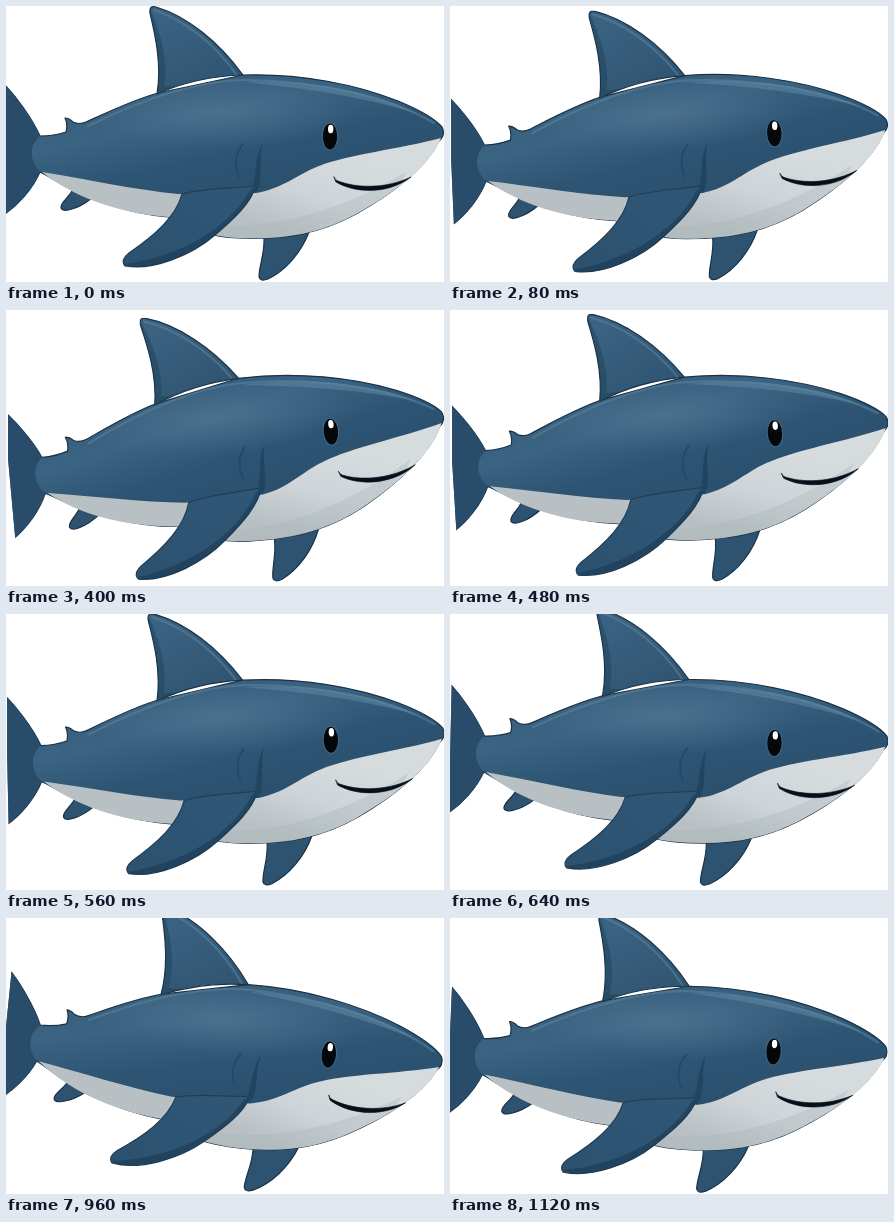
Recreate the animation shown at these times as an HTML page with a canvas. Size 438 by 276 pixels, loop 1.2 s.

```html
<!DOCTYPE html>
<html lang="en">
<head>
<meta charset="utf-8">
<title>Swimming shark</title>
<style>
html, body { margin: 0; width: 100%; height: 100%; overflow: hidden; background: #fff; }
canvas { display: block; }
</style>
</head>
<body>
<canvas id="stage" width="438" height="276"></canvas>
<script>
const W = 438, H = 276, LOOP = 1200, STEP = 80;
const ctx = document.getElementById('stage').getContext('2d');

const INK = '#1a3247';
const body = new Path2D(`M-4 76 C10 90 26 112 34 130 Q48 130 60 126
  Q62 118 59 112 Q63 112 67 116 Q73 119 80 116 C102 106 127 94 152 87
  L237 69 C295 67 352 79 392 95 Q426 109 436 121 Q440 129 433 135
  C420 162 386 188 350 208 C315 227 280 234 232 232
  C205 231 180 222 162 211 C128 208 86 197 38 168 L34 166
  C27 182 13 199 -4 210 Z`);
const belly = new Path2D(`M435 132 C394 143 344 148 313 160 C290 169 276 183 250 187
  L172 188 C130 184 80 173 36 166 C66 190 110 207 162 211
  C180 222 205 231 232 232 C280 234 315 227 350 208 C386 188 423 162 435 132 Z`);
const bellyShade = new Path2D('M208 219 C270 224 340 203 401 165 L380 205 L280 245 L190 235 Z');
const tail = new Path2D('M-4 76 C10 90 26 112 34 130 C22 140 24 156 34 166 C27 182 13 199 -4 210 Z');
const dorsal = new Path2D(`M151 88 C156 58 149 28 144 7 Q143 -1 150 1
  C181 10 213 36 237 69 C205 70 178 76 151 88 Z`);
const dorsalShade = new Path2D('M144 2 C157 32 162 58 158 80 L178 80 L150 92 L140 40 Z');
const dorsalEdge = new Path2D('M148 4 C178 14 208 37 230 68');
const pectoral = new Path2D(`M176 188 C170 211 148 230 123 247 Q114 254 119 260
  C147 265 186 249 209 229 C229 212 244 198 250 180 C223 183 197 182 176 188 Z`);
const pectoralShade = new Path2D('M118 258 C168 252 222 225 244 184 L256 178 L236 225 L150 270 Z');
const pelvic = new Path2D(`M258 231 C259 248 253 259 253 271 Q254 276 262 273
  C279 265 295 247 303 226 Q280 233 258 231 Z`);
const rear = new Path2D('M67 183 C64 191 54 196 55 202 Q57 206 66 203 C77 200 83 194 90 189 Z');
const back = new Path2D('M82 120 C133 95 190 74 240 74 C309 74 384 91 428 117');
const sheen = new Path2D('M238 76 C300 73 372 86 412 108 C362 92 300 82 238 76 Z');
const gill = new Path2D('M237 138 C228 148 229 160 233 171');
const gillFold = new Path2D('M257 137 C249 149 251 166 246 184 L250 187 C259 172 251 158 257 137 Z');
const mouth = new Path2D('M328 171 Q329 174 332 175 C353 183 382 182 405 171 C383 188 350 188 330 176 Z');

function gradient(x0, y0, x1, y1, ...stops) {
  const g = ctx.createLinearGradient(x0, y0, x1, y1);
  stops.forEach((c, i) => g.addColorStop(i / (stops.length - 1), c));
  return g;
}
const skin = gradient(200, 60, 230, 195, '#365d7b', '#3b6382', '#2d5473', '#2b506e');
const finSkin = gradient(210, 180, 150, 265, '#2f5675', '#2c5270');
const dorsalSkin = gradient(160, 10, 200, 85, '#3b6280', '#2f5573');
const white = gradient(330, 150, 300, 235, '#d6dbde', '#ced4d7', '#b8c0c3');
const glow = ctx.createRadialGradient(0, 0, 0, 0, 0, 90);
glow.addColorStop(0, 'rgba(98,134,160,.4)');
glow.addColorStop(1, 'rgba(98,134,160,0)');

function shape(path, fill, line, width = 1.2) {
  ctx.fillStyle = fill;
  ctx.fill(path);
  if (line) stroke(path, line, width);
}
function stroke(path, color, width) {
  ctx.strokeStyle = color;
  ctx.lineWidth = width;
  ctx.stroke(path);
}
function within(path, paint) {
  ctx.save();
  ctx.clip(path);
  paint();
  ctx.restore();
}
function oval(x, y, rx, ry, fill) {
  ctx.beginPath();
  ctx.ellipse(x, y, rx, ry, 0, 0, Math.PI * 2);
  ctx.fillStyle = fill;
  ctx.fill();
}

function shark() {
  shape(rear, '#2d5371', INK);
  shape(pelvic, '#2d5371', INK);
  shape(body, skin, INK);
  shape(tail, '#284c69');
  shape(dorsal, dorsalSkin, INK);
  within(dorsal, () => shape(dorsalShade, 'rgba(28,62,88,.45)'));

  // Soft light on the flank
  within(body, () => {
    ctx.translate(215, 107);
    ctx.scale(1.5, 0.4);
    ctx.fillStyle = glow;
    ctx.fillRect(-90, -90, 180, 180);
  });

  shape(belly, white);
  within(belly, () => shape(bellyShade, 'rgba(164,174,179,.3)'));
  shape(sheen, 'rgba(105,142,167,.45)');
  stroke(back, 'rgba(95,135,162,.5)', 2.2);
  stroke(dorsalEdge, 'rgba(95,135,162,.5)', 2.2);
  shape(pectoral, finSkin, '#203e57');
  within(pectoral, () => shape(pectoralShade, 'rgba(24,56,81,.55)'));
  stroke(gill, '#254964', 1.8);
  shape(gillFold, '#21445f');
  oval(324, 130.5, 8.3, 14, '#3f6886');
  oval(324, 130.5, 7.2, 13, '#05080b');
  oval(324.7, 123, 2.7, 4.2, '#fff');
  shape(mouth, '#071019', '#071019', 0.6);
}

function draw(ms) {
  const a = Math.floor((ms % LOOP) / STEP) * STEP / LOOP * Math.PI * 2;
  const s = Math.sin(a), lag = 1 - Math.cos(a);
  const dx = 1.7 * s + 0.35 * lag, dy = 3.5 * s - 1.6 * lag;

  ctx.fillStyle = '#fff';
  ctx.fillRect(0, 0, W, H);
  ctx.save();
  ctx.beginPath();
  ctx.rect(Math.max(0, Math.round(dx)), 0, W, H);
  ctx.clip();
  ctx.translate(W / 2 + dx, H / 2 + dy);
  ctx.rotate(-6 * s * Math.PI / 180);
  ctx.translate(-W / 2, -H / 2);
  ctx.beginPath();
  ctx.rect(0, 0, W, H);
  ctx.clip();
  shark();
  ctx.restore();
}

ctx.lineJoin = ctx.lineCap = 'round';
const start = performance.now();
function tick() {
  draw(performance.now() - start);
  requestAnimationFrame(tick);
}
tick();
</script>
</body>
</html>
```
